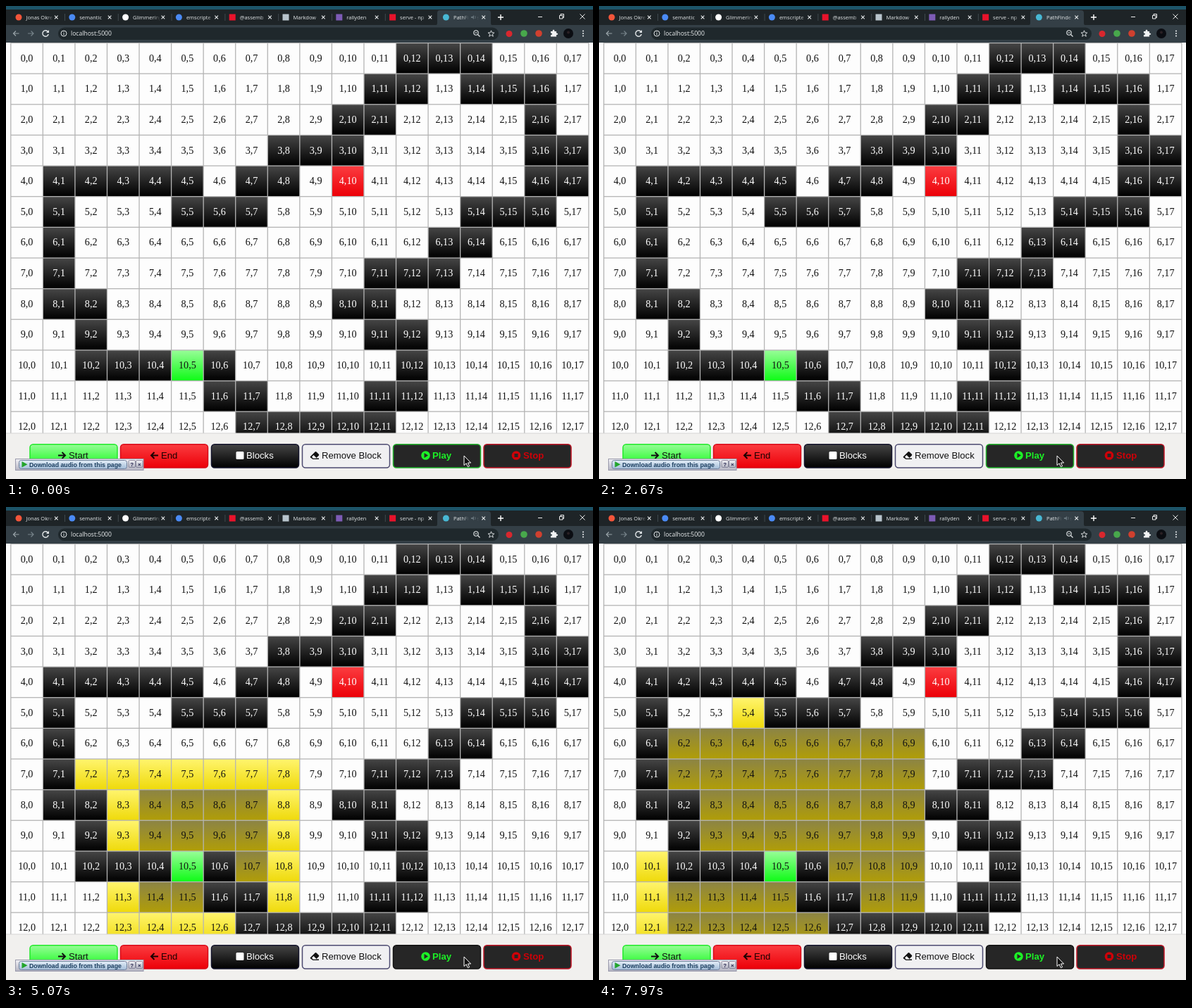
Recreate the animation shown at these times as an HTML page. Size 833 by 672 pixels, loop 8000 ms.

```html
<!DOCTYPE html>
<html lang="en">
<head>
<meta charset="utf-8">
<title>Path finder</title>
<style>
html, body { margin: 0; width: 100%; height: 100%; overflow: hidden; background: #fdfdfd; }
svg { display: block; }
.cell { font: 14.2px "Liberation Serif", serif; text-anchor: middle; }
.ui { font-family: "Open Sans", sans-serif; }
.btn { font: 13.15px "Liberation Sans", sans-serif; }
.bold { font-weight: bold; }
</style>
</head>
<body>
<svg id="stage" width="833" height="672" viewBox="0 0 833 672"></svg>
<script>
const LOOP = 8000;
const STEP = 105, BEGIN = 3790, FRESH = 1000;
const CLICK = 3400, SOUND_OFF = 400, SOUND_ON = 4300;
const COLS = 18, ROWS = 13, LEFT = 6.8, TOP = 52.5, PITCH_X = 45.56, PITCH_Y = 43.64, GAP = 1.3;
const STRIP = "#1e2427", BAR = "#343f46";

// The board runs on below the visible rows.
const board = [
  "............###...",
  "...........##.###.",
  "..........##....#.",
  "........###.....##",
  ".#####.##.E.....##",
  ".#...###......###.",
  ".#...........##...",
  ".#.........###....",
  ".##.......##......",
  "..#........##.....",
  "..###S#.....#.....",
  "......##...##.....",
  ".......#####......",
  "..................",
  ".................."
];

const gradients = {
  wall: ["#454545", "#000"],
  start: ["#96fd96", "#10fb18"],
  end: ["#fb3c40", "#ec0008"],
  fresh: ["#fff46c", "#efda0c"],
  seen: ["#8c8444", "#b09d08"],
  panel: ["#f2f2f6", "#b4b4c2"],
  label: ["#e4eef8", "#a3bdd8"]
};

// Breadth-first search; returns the time at which each cell is reached.
function search() {
  const order = [[-1, 0], [-1, 1], [-1, -1], [0, 1], [0, -1], [1, 0], [1, 1], [1, -1]];
  const reached = {};
  const queue = [[10, 5]];
  for (let i = 0; i < queue.length; i++) {
    const [r, c] = queue[i];
    for (const [dr, dc] of order) {
      const y = r + dr, x = c + dc, key = y + "," + x;
      if (board[y]?.[x] !== "." || key in reached) continue;
      reached[key] = BEGIN + i * STEP;
      queue.push([y, x]);
    }
  }
  return reached;
}

const rect = (x, y, w, h, fill, more = "") =>
  `<rect x="${x}" y="${y}" width="${w}" height="${h}" fill="${fill}" ${more}/>`;
const circle = (x, y, r, fill, more = "") =>
  `<circle cx="${x}" cy="${y}" r="${r}" fill="${fill}" ${more}/>`;
const text = (x, y, str, fill, more = "") =>
  `<text x="${x}" y="${y}" fill="${fill}" ${more}>${str}</text>`;
const line = (d, color, width = 1.2, more = "") =>
  `<path d="${d}" fill="none" stroke="${color}" stroke-width="${width}" ${more}/>`;
const shape = (d, fill, more = "") => `<path d="${d}" fill="${fill}" ${more}/>`;

function defs() {
  const fades = Object.entries(gradients).map(([id, [a, b]]) =>
    `<linearGradient id="${id}" x2="0" y2="1"><stop stop-color="${a}"/><stop offset="1" stop-color="${b}"/></linearGradient>`);
  const edge = (id, color) =>
    `<linearGradient id="${id}"><stop stop-color="${color}" stop-opacity="0"/><stop offset="1" stop-color="${color}"/></linearGradient>`;
  return `<defs>${fades.join("")}${edge("fadeTab", STRIP)}${edge("fadeActive", BAR)}</defs>`;
}

const cells = [];
function grid() {
  let out = rect(LEFT - GAP / 2, 51, COLS * PITCH_X + GAP, 570, "#b4b4b4");
  for (let r = 0; r < ROWS; r++)
    for (let c = 0; c < COLS; c++) {
      const x = LEFT + c * PITCH_X, y = TOP + r * PITCH_Y;
      const kind = board[r][c], key = r + "," + c;
      const fill = { "#": "url(#wall)", S: "url(#start)", E: "url(#end)", ".": "#fdfdfd" }[kind];
      const ink = kind === "#" || kind === "E" ? "#fff" : "#111";
      out += rect((x + GAP / 2).toFixed(2), (y + GAP / 2).toFixed(2), PITCH_X - GAP, PITCH_Y - GAP, fill, `id="c${key}"`) +
        text((x + PITCH_X / 2).toFixed(2), (y + 26.1).toFixed(2), key, ink, 'class="cell"');
      if (kind === ".") cells.push(key);
    }
  return out;
}

function tabs() {
  const list = [
    ["Jonas Okre", "#f2553a", 1], ["semantic", "#4a8af4", 1], ["Glimmering", "#fff", 1],
    ["emscripte", "#4a8af4", 1], ["@assemb", "#e8132b", 0], ["Markdow", "#b8c4cc", 0],
    ["rallyden", "#7d5bb5", 0], ["serve - np", "#e8132b", 0], ["PathFinde", "#48b8d4", 1]
  ];
  let out = rect(0, 0, 833, 6, "#1d5468") + rect(0, 5, 833, 23, STRIP) +
    shape("M608 28q4 0 4-4V10q0-4 4-4h68q4 0 4 4v14q0 4 4 4z", BAR);
  list.forEach(([name, color, round], i) => {
    const x = 18 + i * 75.8, active = i === 8, bg = active ? BAR : STRIP;
    out += round ? circle(x, 16, 4.5, color) : rect(x - 4.5, 11.5, 9, 9, color);
    out += text(x + 10.5, 19, name, "#e4e8ea", 'class="ui" font-size="7.5"');
    out += rect(x + 40, 9, 9, 14, `url(#${active ? "fadeActive" : "fadeTab"})`) + rect(x + 48.5, 9, 11, 14, bg);
    out += line(`M${x + 51} 13.7l4.600 4.600m0-4.600l-4.600 4.600`, "#e8ebec", 1.1);
    if (i < 7) out += line(`M${x + 65.5} 11v10`, "#4a5357", .8);
  });
  out += `<g id="sound">${rect(648, 9, 9, 14, "url(#fadeActive)")}${rect(656, 9, 13, 14, BAR)}` +
    `${shape("M660 15h2l2-2v6l-2-2h-2z", "#66737a")}${line("M665.5 14q1.5 2 0 4", "#66737a", .8)}</g>`;
  return out + line("M698 16h8m-4-4v8", "#fff", 1.4) +
    line("M755 15.5h6M785.5 13.5h4.5v4.5h-4.500zM787 13v-1.5h4.5v5h-1.5M814.5 11.5l7 7m0-7l-7 7", "#eee", 1);
}

function toolbar() {
  const soft = "#e2e6e8";
  return rect(0, 27, 833, 25, BAR) + rect(74, 30.5, 625, 17.5, "#1f282c", 'rx="8.7"') +
    line("M18.5 39h-8m3.500-3.500L10.5 39l3.5 3.5", "#98a3a8") +
    line("M31 39h8m-3.500-3.500L39 39l-3.5 3.5", "#76838a") +
    line("M59.5 36.5a4.200 4.200 0 1 0 .7 3.5", soft, 1.4) + shape("M61 34v4h-4z", soft) +
    circle(82, 39, 4, "none", `stroke="${soft}" stroke-width="1"`) + line("M82 38.3v3M82 36.4v1", soft, 1) +
    text(92, 42.2, "localhost:5000", "#eceff0", 'class="ui" font-size="8.6"') +
    circle(667, 38, 3.2, "none", `stroke="${soft}" stroke-width="1.1"`) + line("M669.5 40.5l3 3M665.5 38h3", soft) +
    line("M688.5 34.8l1.2 3 3.2.2-2.5 2 .9 3.2-2.8-1.8-2.8 1.8.9-3.2-2.5-2 3.2-.2z", soft, .9) +
    circle(714, 39.5, 4.5, "#d9272e") + circle(735, 39, 4.8, "#48a84c") +
    circle(756, 39, 4.8, "#d0402f") +
    shape("M773 36h2.5q0-2.5 1.5-2.5t1.5 2.5h2.5v2.5q2.2 0 2.2 1.3t-2.2 1.3V43.5h-8v-2.5q2 0 2-1.2t-2-1.3z", "#f2f4f5") +
    circle(798, 39, 7, "#0b0d12") + circle(798, 37.5, 2, "#2a2024") +
    [35.5, 39, 42.5].map(y => circle(819, y, 1.1, soft)).join("");
}

function button(x, fill, border, label, labelX, ink, more = "") {
  return rect(x + .5, 622.8, 124, 33.2, fill, `rx="4.5" stroke="${border}" stroke-width="1.5" ${more}`) +
    text(labelX, 643.3, label, ink, `class="btn ${x > 545 ? "bold" : ""}"`);
}

function footer() {
  return rect(0, 607, 833, 65, "#f1f0ee") + rect(0, 606.5, 833, 1, "#d6d6d6") +
    button(33.5, "url(#start)", "#22e82a", "Start", 89, "#111") +
    line("M74 638.5h10m-4.500-4.500l4.500 4.500-4.500 4.500", "#111", 2) +
    button(162, "url(#end)", "#d80a18", "End", 220, "#1b0000") +
    line("M216 638.5h-10m4.500-4.500l-4.500 4.500 4.500 4.500", "#1b0000", 2) +
    button(291, "url(#wall)", "#14142c", "Blocks", 341, "#fff") + rect(326.5, 633, 11, 11, "#fff", 'rx="1.5"') +
    button(420, "#f0f0f2", "#4c4a70", "Remove Block", 448, "#111") +
    shape("M432 640l6.5-6.5q1-1 2 0l3.3 3.3q1 1 0 2L440 642.5h4v1.5h-8.500l-3.5-2.5q-.8-.7 0-1.5z", "#111") +
    shape("M434 640.5l2.5-2.5 4 4-.7.7h-4z", "#f0f0f2") +
    button(549, "#262626", "#22b52c", "Play", 605, "#1cf126", 'id="play"') +
    circle(595.5, 638.5, 6.3, "#1cf126") + shape("M593.5 635l5.5 3.5-5.5 3.5z", "#262626") +
    button(677.5, "#262626", "#c01424", "Stop", 734, "#cf0008") +
    circle(724, 638.5, 6.3, "#cf0008") + rect(721.5, 636, 5, 5, "#262626");
}

function audioBar() {
  const small = (x, label) => rect(x, 645.5, 9.5, 10, "url(#panel)", 'rx="1.5" stroke="#77778f" stroke-width=".8"') +
    text(x + 4.8, 653.5, label, "#23234c", 'class="btn bold" style="font-size:8px" text-anchor="middle"');
  return rect(13.5, 643.5, 181.5, 16, "url(#panel)", 'stroke="#9a9aac"') +
    rect(18.5, 645.5, 153, 12, "url(#label)", 'rx="3" stroke="#6e7f9c"') +
    shape("M22.5 647l8 4.3-8 4.3z", "#22a52c") +
    text(33, 654.5, "Download audio from this page", "#1c3f60", 'class="btn bold" style="font-size:8.8px"') +
    small(174, "?") + small(184.5, "×");
}

const cursor = () =>
  shape("M650 639v13.5l3.2-2.8 2.2 5 2.2-1-2.2-4.7h4.2z", "#111", 'stroke="#fff" stroke-width="1"');

const stage = document.getElementById("stage");
stage.innerHTML = defs() + rect(0, 0, 833, 672, "#fdfdfd") + grid() + tabs() + toolbar() + footer() + audioBar() + cursor();

const reached = search();
const live = cells.filter(key => reached[key] < LOOP)
  .map(key => ({ at: reached[key], node: document.getElementById("c" + key) }));
const play = document.getElementById("play");
const sound = document.getElementById("sound");

function draw(t) {
  for (const { at, node } of live)
    node.setAttribute("fill", t < at ? "#fdfdfd" : t < at + FRESH ? "url(#fresh)" : "url(#seen)");
  play.setAttribute("stroke", t < CLICK ? "#22b52c" : "#111");
  sound.setAttribute("visibility", t < SOUND_OFF || t >= SOUND_ON ? "visible" : "hidden");
}

const origin = performance.now();
function tick() {
  draw((performance.now() - origin) % LOOP);
  requestAnimationFrame(tick);
}
tick();
</script>
</body>
</html>
```
